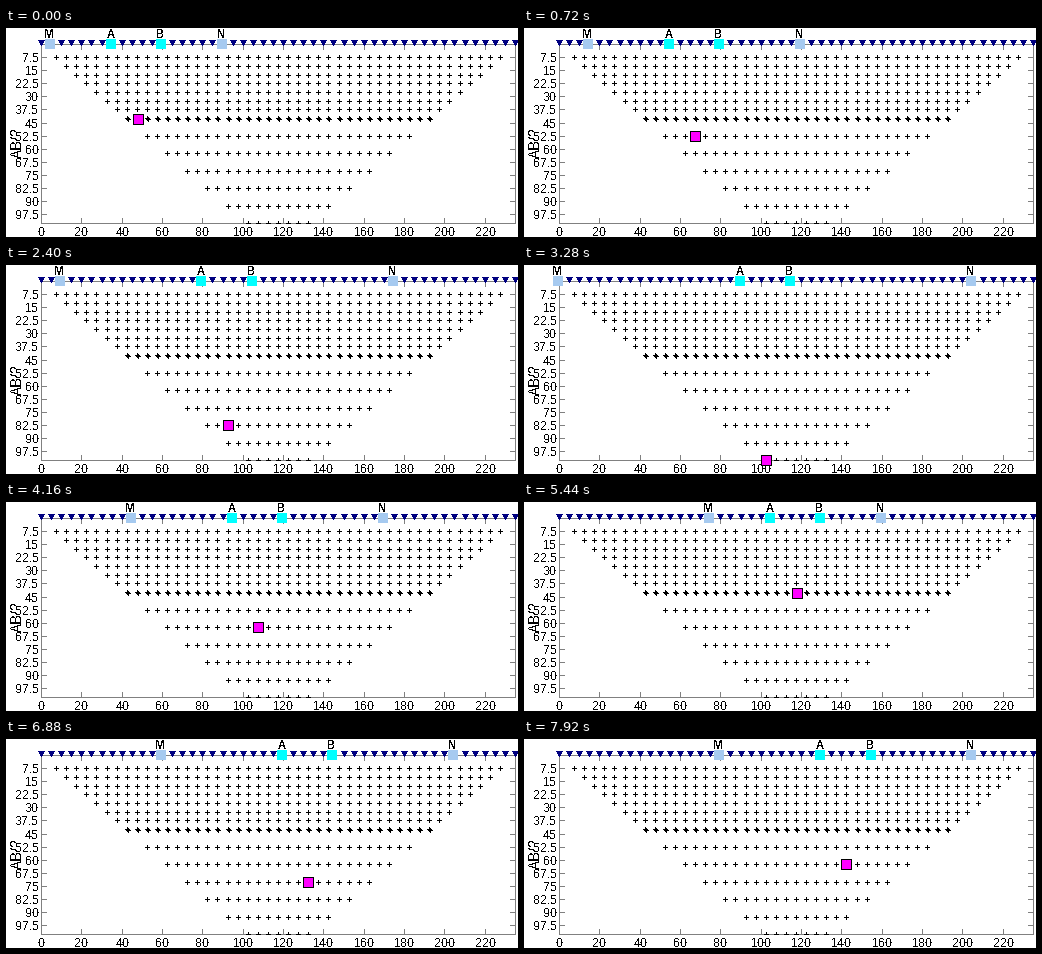
Write a matplotlib script that moves like this. It is 512x209 px and loops after 8 s.

```python
import math

import matplotlib.pyplot as plt
from matplotlib.animation import FuncAnimation
from matplotlib.patches import Polygon, Rectangle

W, H, DPI = 512, 209, 64
FRAMES, INTERVAL = 100, 80
LENGTH, MAX_DEPTH, SPACING = 235, 102.5, 5
LEFT, TOP, RIGHT, BOTTOM = 35, 16, 509, 195
TICK = 5
SHARED_DEPTH = 42.5  # reached by both electrode spacings
GRAY, NAVY = "#808080", "#000080"
PALE, CYAN, MAGENTA = "#a6caf0", "#00ffff", "#ff00ff"

plt.rcParams.update({
    "font.family": "Liberation Sans",
    "text.antialiased": False,
    "text.hinting": "native",
    "text.hinting_factor": 1,
})
fig = plt.figure(figsize=(W / DPI, H / DPI), dpi=DPI, facecolor="white")
ax = fig.add_axes([0, 0, 1, 1])
ax.set(xlim=(0, W), ylim=(H, 0))
ax.axis("off")


def px(v):
    """Pixel column of a distance along the profile."""
    return math.floor(LEFT + 0.5 + (RIGHT - LEFT) * v / LENGTH)


def py(depth):
    """Pixel row of a pseudo depth."""
    return math.floor(TOP + 0.5 + (BOTTOM - TOP) * depth / MAX_DEPTH)


def box(x, y, w, h, color, z=1):
    return ax.add_patch(Rectangle((x, y), w, h, fc=color, lw=0,
                                  antialiased=False, zorder=z))


def label(x, y, text, size=12, **kw):
    return ax.text(x, y, text, fontsize=size * 72 / DPI, va="baseline", **kw)


def cross(x, y):
    box(x - 2, y, 5, 1, "black", 3)
    box(x, y - 2, 1, min(5, BOTTOM + 3 - y), "black", 3)


def draw_axes():
    for y in (TOP, BOTTOM):
        box(LEFT, y, RIGHT - LEFT + 1, 1, GRAY)
    for x in (LEFT, RIGHT):
        box(x, TOP, 1, BOTTOM - TOP + 1, GRAY)
    for v in range(0, LENGTH, 20):
        box(px(v), TOP + 1, 1, TICK, GRAY)
        box(px(v), BOTTOM - TICK, 1, TICK, GRAY)
        label(px(v) + 0.5, 208, str(v), ha="center")
    label(16, 115, "AB/2", 15, rotation=90, rotation_mode="anchor",
          ha="center", zorder=1)
    box(11, py(52.5) - 6, 22, 12, "white", 2)
    for i in range(1, 14):
        y = py(7.5 * i)
        box(LEFT + 1, y, TICK, 1, GRAY)
        box(RIGHT - TICK, y, TICK, 1, GRAY)
        label(33, y + 5, f"{7.5 * i:g}", ha="right", zorder=3)


def draw_electrodes():
    for v in range(0, LENGTH + 1, SPACING):
        x = px(v) + 0.5
        ax.add_patch(Polygon([(x - 3, 12), (x + 3, 12), (x, 18)],
                             fc=NAVY, lw=0, antialiased=False, zorder=3))


def wide_point(mid, depth):
    """Pixel of a wide-spacing point, nudged where two rows coincide."""
    nudge = int(depth == SHARED_DEPTH)
    return px(mid) + nudge, py(depth) + nudge


def centres(depth):
    count = int((LENGTH - 2 * depth) / SPACING) + 1
    return [depth + SPACING * i for i in range(count)]


def draw_points():
    for i in range(8):
        depth = 7.5 + 5 * i
        for mid in centres(depth):
            cross(px(mid), py(depth))
    for i in range(7):
        depth = SHARED_DEPTH + 10 * i
        for mid in centres(depth):
            cross(*wide_point(mid, depth))


def measurements():
    """Array centres left to right, each from the widest spread down."""
    mid = 47.5
    while True:
        for i in range(6, -1, -1):
            reach = SHARED_DEPTH + 10 * i
            if reach <= min(mid, LENGTH - mid):
                yield mid, reach
        mid += SPACING


draw_axes()
draw_electrodes()
draw_points()

sequence = measurements()
steps = [next(sequence) for _ in range(FRAMES)]
probes = []
for name, color in zip("MABN", (PALE, CYAN, CYAN, PALE)):
    probes.append((box(0, 11, 10, 10, color, 5),
                   label(0, 10, name, weight="bold", ha="center", zorder=6)))
outline = box(0, 0, 11, 11, "black", 5)
fill = box(0, 0, 9, 9, MAGENTA, 6)


def update(frame):
    mid, reach = steps[frame]
    places = (mid - reach, mid - 12.5, mid + 12.5, mid + reach)
    for (square, text), v in zip(probes, places):
        left = px(v) - 6
        square.set_x(left)
        text.set_x(left + 4.5)
    x, y = wide_point(mid, reach)
    outline.set_xy((x - 5, y - 5))
    fill.set_xy((x - 4, y - 4))
    return []


anim = FuncAnimation(fig, update, frames=FRAMES, interval=INTERVAL,
                     repeat=True, repeat_delay=0)
plt.show()
```
